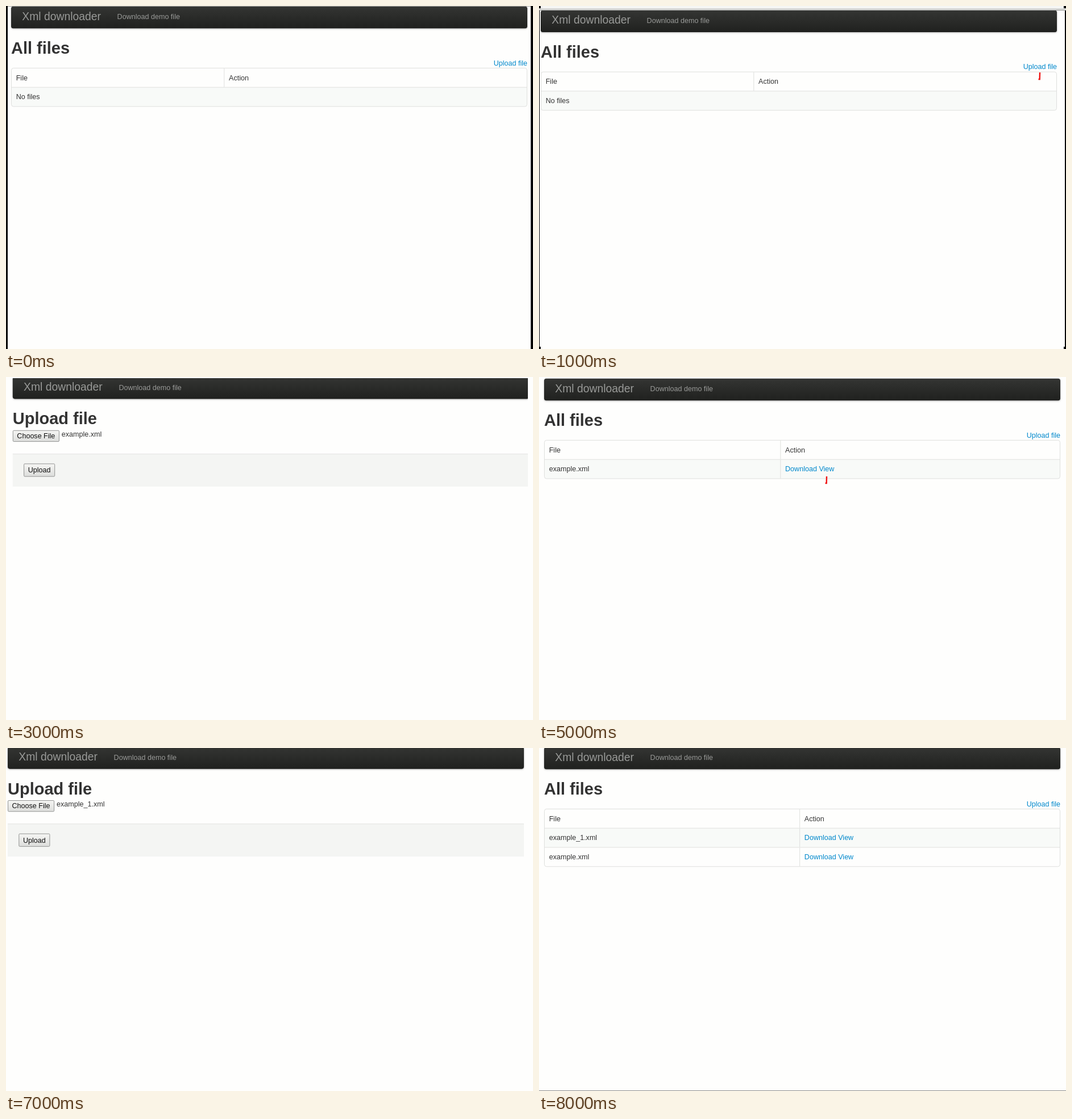
Write an HTML page with a canvas that moves like this. It is 927 by 604 pixels and loops after 9000 ms.

```html
<!DOCTYPE html>
<html>
<head>
<meta charset="utf-8">
<title>Xml downloader</title>
<style>
html, body { margin: 0; width: 100%; height: 100%; overflow: hidden; background: #fefefd; }
canvas { display: block; }
</style>
</head>
<body>
<canvas id="stage" width="927" height="604"></canvas>
<script>
const W = 927, H = 604, ZOOM = 908 / 940;
const c = document.getElementById('stage').getContext('2d');
const SANS = '"Liberation Sans", Arial, sans-serif';
const UI = '"Noto Sans", "Open Sans", sans-serif';
const BG = '#fefefd', INK = '#333', LINK = '#0088cc', LINE = '#dddedc';

function rect(x, y, w, h, fill) {
  c.fillStyle = fill;
  c.fillRect(x, y, w, h);
}

function box(x, y, w, h, r, fill, stroke, lw = 1) {
  c.beginPath();
  c.roundRect(x, y, w, h, r);
  if (fill) { c.fillStyle = fill; c.fill(); }
  if (stroke) { c.strokeStyle = stroke; c.lineWidth = lw; c.stroke(); }
}

function text(s, x, y, color = INK, font = '13px ' + SANS, align = 'left') {
  c.font = font;
  c.fillStyle = color;
  c.textAlign = align;
  c.fillText(s, x, y);
}

function path(points, color, lw = 1) {
  c.beginPath();
  points.forEach(([x, y], i) => i ? c.lineTo(x, y) : c.moveTo(x, y));
  c.strokeStyle = color;
  c.lineWidth = lw;
  c.stroke();
}

function shape(points, fill) {
  c.beginPath();
  points.forEach(([x, y]) => c.lineTo(x, y));
  c.closePath();
  c.fillStyle = fill;
  c.fill();
}

function fade(y, h, top, bottom) {
  const g = c.createLinearGradient(0, y, 0, y + h);
  g.addColorStop(0, top);
  g.addColorStop(1, bottom);
  return g;
}

// Web page in its own 940 px wide layout
function page(ox, oy, title, body, clip) {
  c.save();
  if (clip) {
    c.beginPath();
    c.rect(...clip);
    c.clip();
  }
  c.translate(ox, oy);
  c.scale(ZOOM, ZOOM);
  c.save();
  c.shadowColor = 'rgba(0,0,0,.3)';
  c.shadowBlur = 3;
  c.shadowOffsetY = 1;
  box(0, 0, 940, 40, 4, fade(0, 40, '#343533', '#20211f'));
  c.restore();
  rect(2, 39, 936, 1, 'rgba(0,0,0,.25)');
  text('Xml downloader', 20, 24.8, '#999a98', '20px ' + SANS);
  text('Download demo file', 193.2, 23.6, '#999a98');
  text(title, 0, 86.5, INK, 'bold 30px ' + SANS);
  body();
  c.restore();
}

function table(link, split, rows, { boldKeys = false, linkCells = false } = {}) {
  text(link, 940, 107.5, LINK, undefined, 'right');
  rows.forEach(([key, value], i) => {
    const y = 112 + i * 35;
    if (i % 2) rect(1, y + 1, 938, 34, '#f8faf8');
    if (i) rect(1, y, 938, 1, LINE);
    if (value) rect(split, y + 1, 1, 34, LINE);
    text(key, 9, y + 22.4, INK, (boldKeys && i ? 'bold ' : '') + '13px ' + SANS);
    if (value) text(value, split + 9, y + 22.4, linkCells && i ? LINK : INK);
  });
  box(.5, 112.5, 939, rows.length * 35, 4, null, LINE);
}

function button(label, x, y, w, h) {
  box(x + .5, y + .5, w - 1, h - 1, 1.5, fade(y, h, '#f6f6f4', '#dcdddb'), '#8f908e');
  text(label, x + w / 2, y + h / 2 + 4.5, '#111', undefined, 'center');
}

function form(file) {
  return () => {
    button('Choose File', 0, 97.3, 85, 21);
    text(file, 89, 109, INK);
    rect(0, 140, 940, 60, '#f4f5f3');
    rect(0, 140, 940, 1, '#e3e4e2');
    button('Upload', 20, 158, 57, 24);
  };
}

const HEAD = ['File', 'Action'];
const fileRow = name => [name, 'Download View'];
const allFiles = (split, names) => () =>
  table('Upload file', split, [HEAD, ...names.map(fileRow)], { linkCells: true });
const noFiles = () => table('Upload file', 387.5, [HEAD, ['No files']]);

function redMark(x, y) {
  path([[x, y], [x - .3, y + 12], [x - 2.5, y + 12]], '#f01414', 2.4);
}

// Desktop dialog pieces
const ui = (s, x, y, color = '#2c2e2b', bold = '', align = 'left') =>
  text(s, x, y, color, bold + '11.6px ' + UI, align);

function folder(x, y) {
  box(x + .5, y + 1.5, 8, 4, 1, '#7fa55c', '#64824b');
  box(x + .5, y + 3.5, 14, 9, 1, fade(y + 3, 10, '#bdd5a5', '#79a157'), '#6f8a59');
}

function screen(x, y) {
  box(x + .5, y + .5, 14, 12, 1, '#4c5449', '#3b4238');
  rect(x + 2, y + 2, 11, 7, fade(y + 2, 7, '#a1cf78', '#5f9a39'));
}

function disk(x, y) {
  shape([[x + 2, y], [x + 13, y], [x + 15, y + 9], [x, y + 9]], '#b9bcb8');
  c.beginPath();
  c.ellipse(x + 7.5, y + 5, 4.5, 3.5, 0, 0, 7);
  c.fillStyle = '#e5e7e4';
  c.fill();
  box(x + .5, y + 9.5, 14, 4, 1, '#d3d5d2', '#646762');
  path([[x + .5, y + 9], [x + 2, y + .5], [x + 13, y + .5], [x + 14.5, y + 9]], '#747772');
}

function recent(x, y) {
  c.beginPath();
  c.arc(x, y, 4.6, -2.7, 2.4);
  c.strokeStyle = '#454843';
  c.lineWidth = 1.5;
  c.stroke();
  shape([[x - 7, y - 2], [x - 1.8, y - 2], [x - 4.4, y + 1.5]], '#454843');
  path([[x, y - 2.5], [x, y + .5], [x + 2, y + .5]], '#454843');
}

const emblems = {
  home: (x, y) => shape([[x + 4, y + 9], [x + 8, y + 5], [x + 12, y + 9], [x + 10, y + 12], [x + 6, y + 12]], '#eef3e9'),
  video: (x, y) => { rect(x + 7, y + 3, 8, 11, '#3d433c'); rect(x + 9, y + 4, 4, 9, '#86a9c2'); },
  docs: (x, y) => { rect(x + 7, y + 3, 8, 11, '#f2f4f0'); rect(x + 9, y + 6, 4, 1, '#898c87'); },
  load: (x, y) => { box(x + 6, y + 4, 9, 10, 2, '#f0f3ed'); shape([[x + 7, y + 8], [x + 14, y + 8], [x + 10.5, y + 12]], '#71984f'); },
  image: (x, y) => { rect(x + 5, y + 5, 10, 8, '#4a4d49'); box(x + 8, y + 7, 4, 4, 2, '#c4ccd3'); },
  music: (x, y) => { path([[x + 8, y + 12], [x + 8, y + 5], [x + 13, y + 4], [x + 13, y + 11]], '#23281f', 1.6); box(x + 5, y + 11, 4, 3, 2, '#23281f'); box(x + 10, y + 10, 4, 3, 2, '#23281f'); }
};

const PLACES = [
  ['Недавние', 'recent'], ['Домашняя папка', 'home'], ['Рабочий стол', 'screen'],
  ['Видео', 'video'], ['Документы', 'docs'], ['Загрузки', 'load'],
  ['Изображения', 'image'], ['Музыка', 'music']
];
const DEVICES = ['Том 200 GB', 'Том 100 GB', 'Том 100 GB', 'Компьютер'];

function place([label, kind], i) {
  const y = 101 + i * 24.15, top = Math.round(y) - 7;
  if (kind === 'recent') recent(192, y - 1);
  else if (kind === 'screen') screen(184, top);
  else {
    folder(184, top);
    emblems[kind](184, top);
  }
  ui(label, 201, y + 4);
}

function xmlRow(name, size, date, y, color) {
  box(314.5, y - 7.5, 14, 14, 2, '#f8f8f6', '#b4b6b2');
  text('</>', 321.5, y + 3, '#e0507c', '8px ' + UI, 'center');
  ui(name, 331.5, y + 4, color);
  ui(size, 712, y + 4, color);
  ui(date, 769.5, y + 4, color);
}

function browserBar() {
  rect(0, 0, W, 38, fade(0, 38, '#dadbd9', '#cbcdca'));
  rect(0, 0, W, 7, '#dfe0de');
  rect(0, 7, W, 1, '#bcbebb');
  rect(0, 37, W, 1, '#b4b6b3');
  rect(76, 0, 1, 4, '#868885');
  ui('- Interface', -3, 27, '#555754');
  box(71, 17, 6, 4, 1, '#6d6f6c');
  box(71, 19, 14, 10, 1, '#6d6f6c');
  ui('symfony', 93, 27, '#3c3e3b');
  ui('_daem', 880, 27, '#777976');
  rect(0, 595, W, 9, '#c9cbc8');
  rect(0, 594, W, 1, '#b5b7b4');
  rect(76, 601, 1, 3, '#868885');
}

function sideShadow(x, w, from, to) {
  const g = c.createLinearGradient(x, 0, x + w, 0);
  g.addColorStop(0, `rgba(0,0,0,${from})`);
  g.addColorStop(1, `rgba(0,0,0,${to})`);
  rect(x, 0, w, H, g);
}

function dialog() {
  page(60, 37.9, 'Upload file', form('No file chosen'), [0, 38, W, H]);
  browserBar();
  sideShadow(134, 15, 0, .3);
  sideShadow(880, 15, .3, 0);
  rect(149, 0, 731, H, '#d4d6d3');
  rect(149, 0, 1, H, '#7c7e7b');
  rect(879, 0, 1, H, '#7c7e7b');

  const raised = fade(15, 31, '#f0f1ef', '#d8dad7');
  box(164.5, 15.5, 31, 30, 3, raised, '#979a96');
  path([[173, 24], [184, 34]], '#30332f', 4);
  shape([[182, 36], [185.5, 32.5], [187, 37.5]], '#30332f');
  for (let i = 0; i < 3; i++) rect(171 + i * 4, 36, 2, 2, '#30332f');

  box(208.5, 15.5, 243, 30, 3, raised, '#979a96');
  box(391.5, 15.5, 60, 30, [0, 3, 3, 0], fade(15, 31, '#a5a7a5', '#b6b8b5'), '#7f827e');
  [230, 282].forEach(x => rect(x, 16, 1, 29, '#a4a7a3'));
  shape([[218, 30], [222, 27.5], [222, 32.5]], '#333632');
  folder(238, 23);
  emblems.home(238, 23);
  ui('wren', 255, 34);
  screen(290, 23);
  ui('Рабочий стол', 307, 34);
  ui('example', 398, 34);

  box(163.5, 58.5, 142, 502, 1, '#e8ebe8', '#8f928e');
  ui('Места', 178, 78, '#2c2e2b', 'bold ');
  PLACES.forEach(place);
  ui('Устройства', 178, 301, '#2c2e2b', 'bold ');
  DEVICES.forEach((label, i) => {
    const y = 324 + i * 24.2;
    disk(184, Math.round(y) - 8);
    ui(label, 201, y + 4.5);
  });
  for (let i = 0; i < 5; i++) box(307.5, 298 + i * 5.3, 3, 3, 1.5, '#a9aba8');

  box(311.5, 58.5, 553, 502, 1, '#f5f8f4', '#8f928e');
  rect(312, 59, 539, 23, fade(59, 23, '#f3f4f2', '#dcdedb'));
  rect(312, 82, 539, 1, '#a9aca8');
  [706, 764].forEach(x => rect(x, 59, 1, 23, '#a9aca8'));
  ui('Имя', 318, 74);
  ui('Размер', 713, 74);
  ui('Изменён', 771, 74);
  shape([[688.5, 67.5], [698.5, 67.5], [693.5, 73]], '#2a2c29');
  rect(312, 83, 539, 21, fade(83, 21, '#98b578', '#86a564'));
  xmlRow('example.xml', '170 байт', 'Вчера в 18:43', 93, '#f8faf5');
  xmlRow('example_1.xml', '187 байт', '21:42', 115.5);
  rect(851, 59, 13, 501, '#d1d3d0');
  rect(850, 59, 1, 501, '#a5a8a4');
  box(852.5, 61.5, 9, 497, 4.5, '#dcdedb', '#8c8f8b');

  box(696.5, 574.5, 79, 26, 3, fade(574, 27, '#f2f3f1', '#d9dbd8'), '#939692');
  ui('Cancel', 735.5, 591.5, undefined, '', 'center');
  box(784, 574, 80, 26, 3, fade(574, 27, '#f2f3f1', '#d9dbd8'), '#86a965', 1.8);
  ui('Open', 823.5, 591.5, undefined, '', 'center');
}

const scenes = [
  () => {
    page(9, .7, 'All files', noFiles);
    rect(0, 0, W, 1, '#a2a3a1');
    rect(0, 0, 3, H, '#000');
    rect(923, 0, 4, H, '#000');
  },
  () => {
    page(3, 7.4, 'All files', noFiles);
    rect(0, 0, W, 4, '#f6f6f4');
    rect(0, 4, W, 3, '#d6d7d5');
    rect(0, 7, W, 1, '#989997');
    rect(0, 8, 1, H, '#000');
    rect(925, 8, 2, H, '#000');
    [0, 600].forEach(y => {
      rect(0, y, 3, 4, '#000');
      rect(923, y, 4, 4, '#000');
    });
    redMark(881, 117);
  },
  dialog,
  () => page(11.8, -.2, 'Upload file', form('example.xml'), [0, 2, 918, 600]),
  () => page(9, .7, 'All files', allFiles(430, ['example.xml'])),
  () => {
    page(9, 2.7, 'All files', allFiles(430, ['example.xml']));
    redMark(506, 175);
  },
  () => page(8, 8.4, 'View file', () => table('Files', 251, [
    ['Field', 'Value'], ['To', 'Nelo'], ['From', 'Vari'],
    ['Heading', 'Reminder'], ['Body', "Don't forget me this weekend!"]
  ], { boldKeys: true }), [0, 10, W, H]),
  () => page(3, -2, 'Upload file', form('example_1.xml')),
  () => {
    page(9, -1.3, 'All files', allFiles(465, ['example_1.xml', 'example.xml']));
    rect(0, 603, W, 1, '#8b8c8a');
  }
];

let start, shown = -1;

function tick(now) {
  start ??= now;
  const i = Math.floor((now - start) % 9000 / 1000);
  if (i !== shown) {
    shown = i;
    rect(0, 0, W, H, BG);
    scenes[i]();
  }
  requestAnimationFrame(tick);
}
requestAnimationFrame(tick);
</script>
</body>
</html>
```
